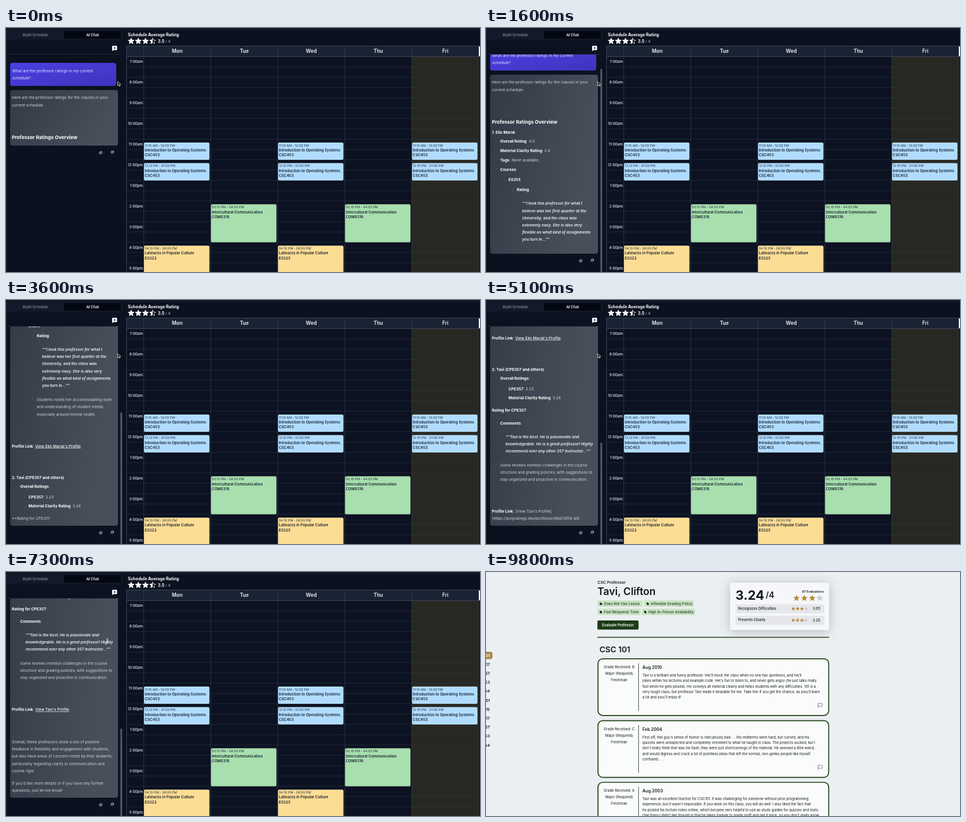
These frames come from a looping animation (800 px wide and 413 px high, 9900 ms). An HTML page:

```html
<!DOCTYPE html>
<html lang="en">
<head>
<meta charset="utf-8">
<title>Schedule chat</title>
<style>
html, body { margin: 0; width: 100%; height: 100%; overflow: hidden; background: #0c1120; }
svg { display: block; width: 800px; height: 413px; font-family: Inter, "Liberation Sans", sans-serif; }
text { white-space: pre; }
.m { font-weight: 500; }
.s { font-weight: 600; }
.b { font-weight: 700; }
.q { font-weight: 600; font-style: italic; }
.mid { text-anchor: middle; }
.end { text-anchor: end; }
#rating { filter: drop-shadow(0 2px 9px rgba(40, 50, 60, .28)); }
</style>
</head>
<body>
<svg viewBox="0 0 800 413">
  <defs>
    <linearGradient id="bubble" x2="1" y2="1"><stop stop-color="#4a40e2"/><stop offset="1" stop-color="#3e34be"/></linearGradient>
    <linearGradient id="card" x2="1" y2=".35"><stop stop-color="#323a46"/><stop offset="1" stop-color="#484f5a"/></linearGradient>
    <clipPath id="view"><rect y="45" width="203" height="368"/></clipPath>
  </defs>
  <g id="planner"></g>
  <rect id="blank" width="800" height="413" fill="#2d2d2d"/>
  <g id="profile"></g>
  <g id="cursor">
    <path id="arrow" d="M0 0V7.2L1.7 5.7L2.9 8.3L4.1 7.7L2.9 5.2H5.2Z" fill="#111" stroke="#fff" stroke-width=".7"/>
    <path id="beam" d="M-2 0Q0 0 0 1V6Q0 7 -2 7M2 0Q0 0 0 1M0 6Q0 7 2 7M-1 3.5H1" fill="none" stroke="#fff" stroke-width=".8"/>
  </g>
</svg>
<script>
const LOOP = 9900, STEP = 100;
const el = id => document.getElementById(id);

// Drawing helpers; text is placed by its vertical centre.
const text = (x, cy, size, str, fill, cls = '') =>
  `<text x="${x}" y="${cy + size * .36}" font-size="${size}" fill="${fill}" class="${cls}">${str}</text>`;
const rect = (x, y, w, h, fill, r = 0, more = '') =>
  `<rect x="${x}" y="${y}" width="${w}" height="${h}" rx="${r}" fill="${fill}" ${more}/>`;
const path = (d, stroke, width = .8, fill = 'none') =>
  `<path d="${d}" fill="${fill}" stroke="${stroke}" stroke-width="${width}" stroke-linejoin="round"/>`;
const star = (cx, cy, r, fill, part = 1, stroke = 'none') => {
  const edge = cx - r + 2 * r * part;
  const pts = Array.from({ length: 10 }, (_, i) => {
    const a = i * Math.PI / 5 - Math.PI / 2, d = i % 2 ? r * .46 : r;
    return [Math.min(edge, cx + d * Math.cos(a)).toFixed(2), (cy + d * Math.sin(a)).toFixed(2)];
  });
  return `<polygon points="${pts.join(' ')}" fill="${fill}" stroke="${stroke}" stroke-width=".7" stroke-linejoin="round"/>`;
};
const lerpTable = (table, t) => {
  let i = 1;
  while (i < table.length - 1 && table[i][0] < t) i++;
  const a = table[i - 1], b = table[i];
  const k = Math.max(0, Math.min(1, (t - a[0]) / (b[0] - a[0])));
  return a.slice(1).map((v, j) => v + (b[j + 1] - v) * k);
};

// ---- Planner: tabs and calendar ----
const COL = 113.1, HOUR = 34.9, LEFT = 232.5, TOP = 48.5;

function event(day, from, to, title, code, time, fill) {
  const x = LEFT + day * COL + .5, y = TOP + (from - 7) * HOUR;
  return rect(x, y, 110.2, (to - from) * HOUR, fill, 2, 'stroke="#fff" stroke-opacity=".35" stroke-width=".6"') +
    text(x + 1.2, y + 4.7, 5.4, time, '#263040') +
    text(x + 1.2, y + 12.7, 6.25, title, '#1a2230', 's') +
    text(x + 1.2, y + 21.3, 6.25, code, '#1a2230', 's');
}

function calendar() {
  let s = rect(203, 30, 597, 383, '#0c1221') + rect(204, 30.5, 594, 18, '#1a2333') +
    rect(LEFT + 4 * COL, TOP, COL, 365, '#282823');
  for (let i = 1; i < 21; i++) s += path(`M204 ${TOP + i * HOUR / 2}H798`, '#2b3446', .6);
  for (let i = 0; i < 6; i++) s += path(`M${LEFT + i * COL} 30.5V413`, '#3a4354', .7);
  s += path('M203.5 413V30.5H798M204 48.5H798', '#465062', .8) + rect(798, 31, 2, 17, '#f4f5f7');
  ['Mon', 'Tue', 'Wed', 'Thu', 'Fri'].forEach((d, i) =>
    s += text(LEFT + (i + .5) * COL, 38.5, 8.4, d, '#f3f4f6', 's mid'));
  for (let h = 7; h < 18; h++)
    s += text(231, 57 + (h - 7) * 34.95, 6.2, `${(h - 1) % 12 + 1}:00${h < 12 ? 'am' : 'pm'}`, '#e8eaee', 'm end');
  const os = 'Introduction to Operating Systems';
  for (const d of [0, 2, 4]) {
    s += event(d, 11 + 1 / 6, 12, os, 'CSC453', '11:10 AM - 12:00 PM', '#b0dcff');
    s += event(d, 12 + 1 / 6, 13, os, 'CSC453', '12:10 PM - 01:00 PM', '#b0dcff');
  }
  for (const d of [1, 3])
    s += event(d, 14 + 1 / 6, 16, 'Intercultural Communication', 'COMS316', '02:10 PM - 04:00 PM', '#a7e0ae');
  for (const d of [0, 2])
    s += event(d, 16 + 1 / 6, 18, 'Latina/os in Popular Culture', 'ES323', '04:10 PM - 06:00 PM', '#fddd94');
  return s;
}

function planner() {
  let s = rect(0, 0, 800, 413, '#0c1120') + path('M0 2.5H800M.5 2V413', '#283042', .7) +
    rect(1, 4, 195, 15, '#131a2a', 2) + rect(98, 5, 96, 13, '#030711', 2) +
    text(49.7, 11.5, 6, 'Build Schedule', '#8a93a3', 'm mid') +
    text(146.2, 11.5, 6.1, 'AI Chat', '#fff', 's mid') +
    path('M1 20.5H196', '#1c2434', .6) + path('M1 44.5H196', '#2a3243', .7) +
    path('M179.5 30.5H187V37H181.5L179.5 38.6Z', '#fff', .8, '#fff') +
    path('M183.3 32.2V35.6M181.6 33.9H185', '#0c1120', .9) +
    '<g clip-path="url(#view)"><g id="chat"></g></g><g id="bar"></g>' +
    text(205.8, 11.5, 7.05, 'Schedule Average Rating', '#fff', 'b');
  for (let i = 0; i < 3; i++) s += star(211.2 + i * 12.1, 22.3, 5.5, '#fff', 1, '#fff');
  s += star(247.5, 22.3, 5.5, 'none', 1, '#fff') + star(247.5, 22.3, 5.5, '#fff', .5) +
    text(256.3, 22.5, 7, '3.5', '#fff', 'b') + text(269, 22.5, 6.6, '/ 4', '#b4bac4');
  return s + calendar();
}

// ---- Chat: rows are [centre y, x, text, kind, space below]; *..* is bold ----
const SITE = 'https://polyratings.dev/professor/';
const link = (label, id) => ({ label, url: SITE + id });
const ROWS = [
  [118, 10, 'Here are the professor ratings for the classes in your'],
  [130.3, 10, 'current schedule:'],
  [185, 10, 'Professor Ratings Overview', 'h', 14],
  [203, 10, '*1. Elin Marsk*'],
  [217.7, 24, '*Overall Rating*: 4.0', 'li'],
  [233.6, 24, '*Material Clarity Rating*: 2.0', 'li'],
  [249.3, 24, '*Tags*: None available.', 'li'],
  [265.2, 24, '*Courses*:', 'li'],
  [282.6, 38, '*ES255*', 'li'],
  [299.7, 52, '*Rating*:', 'li'],
  [323, 61, '““I took this professor for what I', 'q', 24],
  [335.2, 61, 'believe was her first quarter at the', 'q', 24],
  [347.4, 61, 'University, and the class was', 'q', 24],
  [359.6, 61, 'extremely easy. She is also very', 'q', 24],
  [371.8, 61, 'flexible on what kind of assignments', 'q', 24],
  [384, 61, 'you turn in...””', 'q', 24],
  [408, 52, 'Students noted her accommodating style', 'li'],
  [420.3, 52, 'and understanding of student needs,'],
  [432.5, 52, 'especially around mental health.'],
  [486.5, 10, '*Profile Link*: ', link("View Elin Marsk's Profile", '5d0c27fa-3be1-4c8e-a7f2-90d41b6e8c35')],
  [540.2, 10, '*2. Tavi (CPE357 and others)*'],
  [555, 24, '*Overall Ratings*:', 'li'],
  [572.6, 38, '*CPE357*: 3.23', 'li'],
  [588.3, 38, '*Material Clarity Rating*: 3.24', 'li'],
  [609.3, 10, '*Rating for CPE357*:'],
  [630.5, 24, '*Comments*:', 'li'],
  [653.4, 33, '““Tavi is the best. He is passionate and', 'q', 24],
  [665.6, 33, 'knowledgeable. He is a great professor! Highly', 'q', 24],
  [677.9, 33, 'recommend over any other 357 instructor...””', 'q', 24],
  [701.4, 24, 'Some reviews mention challenges in the course', 'li'],
  [713.6, 24, 'structure and grading policies, with suggestions to'],
  [725.8, 24, 'stay organized and proactive in communication.'],
  [780, 10, '*Profile Link*: ', link("View Tavi's Profile", '8bb1391d-a16e-4d27-b1c9-3f7a60e25d18')],
  [834.5, 10, 'Overall, these professors show a mix of positive'],
  [846.8, 10, 'feedback in flexibility and engagement with students,'],
  [859, 10, 'but also have areas of concern noted by their students,'],
  [871.3, 10, 'particularly regarding clarity in communication and'],
  [883.5, 10, 'course rigor.'],
  [904.6, 10, "If you'd like more details or if you have any further"],
  [917, 10, 'questions, just let me know!']
].map(([y, x, str, kind, pad = 12]) => {
  const full = kind?.url ? `${str}[${kind.label}](${kind.url})` : str;
  return { y, x, str, kind, pad, full };
});
let total = 0;
for (const r of ROWS) { r.at = total; total += r.full.length; }

const upTo = s => {
  const r = ROWS.find(row => row.full.includes(s));
  return r.at + r.full.indexOf(s) + s.length;
};
const TYPED = [
  [0, upTo('Ratings Overview')], [1600, upTo('you turn in...””')],
  [3600, upTo('*Rating for CPE357')], [5100, upTo('8bb1391d-a16')], [6700, total]
];

// An unfinished bold run still shows its asterisks.
const rich = s => s.split('*').map((p, i, all) =>
  i % 2 === 0 ? p : i < all.length - 1 ? `<tspan class="b" fill="#fff">${p}</tspan>` : '**' + p).join('');

const SIZE = 6.53, LINE = 12.2, BODY = '#d0d4da';

function drawRow(r, n) {
  let out = '', last = r.y;
  const line = (y, str) => out += text(r.x, y, SIZE, str, BODY);
  if (r.kind === 'h') out = text(r.x, r.y, 8.15, r.full.slice(0, n), '#fff', 'b');
  else if (r.kind === 'q') out = text(r.x, r.y, SIZE, r.full.slice(0, n), '#f3f4f6', 'q');
  else if (r.kind?.url) {
    if (n >= r.full.length)
      line(r.y, rich(r.str) + `<tspan class="m" fill="#fff" text-decoration="underline">${r.kind.label}</tspan>`);
    else {
      const split = r.full.indexOf('](') + 1, cut = r.full.slice(0, n);
      line(r.y, rich(cut.slice(0, split)));
      (cut.slice(split).match(/.{1,47}/g) || []).forEach(p => line(last += LINE, p));
    }
  } else {
    line(r.y, rich(r.full.slice(0, n)));
    if (r.kind === 'li') out += `<circle cx="${r.x - 7}" cy="${r.y}" r=".9" fill="#515a67"/>`;
  }
  return [out, last + r.pad];
}

const thumb = (x, y, flip) =>
  `<g transform="translate(${x} ${y}) scale(${flip})">` +
  path('M-2.2 -.3H-1.1V2.3H-2.2ZM-1.1 -.3L.2 -2.4Q1 -2.2 .7 -.6H2.3L1.8 2.3H-1.1', '#e8eaee', .7) + '</g>';

function drawChat(t) {
  const typed = Math.round(lerpTable(TYPED, t)[0]);
  let body = '', bottom = 0;
  for (const r of ROWS) {
    const n = typed - r.at;
    if (n <= 0) break;
    const [s, b] = drawRow(r, n);
    body += s;
    bottom = b;
  }
  const scroll = Math.max(0, bottom - 382);
  el('chat').setAttribute('transform', `translate(0 ${-scroll})`);
  el('chat').innerHTML = rect(7, 59, 179, 39, 'url(#bubble)', 4) +
    text(10.5, 72.3, SIZE, 'What are the professor ratings in my current', '#e6e9ff') +
    text(10.5, 84.8, SIZE, 'schedule?', '#e6e9ff') +
    rect(7, 105, 182, bottom - 105, 'url(#card)', 4) + body +
    thumb(160, bottom + 11.5, 1) + thumb(179.5, bottom + 11.5, -1);
  const len = 368 * 368 / (368 + scroll);
  el('bar').innerHTML = scroll ? rect(192.8, 413 - len, 3.4, len, '#4a5260', 1.5) : '';
}

// ---- Professor page ----
const GREEN = '#21451b', INK = '#15181c', GOLD = '#b98a34', PALE = '#c9ced6';

const tag = (x, y, w, label) => rect(x, y, w, 11, '#c9e6c5', 2) +
  path(`M${x + 4} ${y + 4}h2l2.2 2.2l-2 2l-2.2 -2.2Z`, INK, .4, INK) +
  text(x + 11, y + 5.6, 6.1, label, '#2a3a2a', 'm');

function review(y, grade, date, lines) {
  let s = rect(189, y + .8, 389.4, 96, '#fafcfb', 8, `stroke="${GREEN}" stroke-width="1.7"`);
  ['Grade Received: ' + grade, 'Major (Required)', 'Freshman'].forEach((l, i) =>
    s += text(224.7, y + 15 + i * 11, 5.95, l, INK, 'mid'));
  s += path(`M257.5 ${y + 8.5}v80.5`, '#3a3f45', .9) + text(264, y + 15.5, 7.2, date, INK, 's');
  lines.forEach((l, i) => s += text(264, y + 28.8 + i * 9.35, 5.9, l, INK));
  return s + path(`M560.5 ${y + 84}v-7.5q2 -.9 3.6 0t3.6 0v4.8q-2 .9 -3.6 0t-3.6 0`, '#4c5a68', .7);
}

function score(y, label, value, part) {
  let s = rect(421, y, 150, 15.5, '#e5e7ea', 2) + text(425.5, y + 7.3, 5.9, label, INK, 'm') +
    text(564, y + 7.5, 6, value, INK, 'm end');
  for (let i = 0; i < 4; i++) s += star(518.6 + i * 7.3, y + 7.7, 3.5, i < 3 ? GOLD : PALE);
  return s + star(540.5, y + 7.7, 3.5, GOLD, part);
}

function profile() {
  let s = rect(0, 0, 800, 413, '#eceff2') + '<g id="page">' +
    text(188.3, 17.6, 6.7, 'CSC Professor', INK, 's') +
    text(188, 33.2, 17.2, 'Tavi, Clifton', INK, 's') +
    tag(188, 48, 77, 'Does Not Use Lessia') + tag(267, 48, 84, 'Inflexible Grading Policy') +
    tag(188, 62, 73, 'Fast Response Time') + tag(263, 62, 90, 'High In-Person Availability') +
    rect(188, 82, 69.5, 15.5, '#1d3b16', 2) + text(222.8, 89.8, 5.9, 'Evaluate Professor', '#fff', 's mid') +
    path('M188 110.5H579', GREEN, 1.5) +
    `<g id="rating">${rect(412, 18, 167, 80, '#f5f7f9', 3)}</g>` +
    text(421, 38.7, 21.7, '3.24', INK, 'b') + text(472, 39, 14, '/4', INK, 's') +
    text(570, 33.6, 5.2, '87 Evaluations', INK, 's end');
  for (let i = 0; i < 4; i++) s += star(524 + i * 13.3, 44.3, 5.8, i < 3 ? GOLD : PALE);
  s += star(563.9, 44.3, 5.8, GOLD, .24) +
    score(54.5, 'Recognizes Difficulties', '3.05', .05) + score(74, 'Presents Clearly', '3.25', .25) +
    text(191.5, 130.8, 13.4, 'CSC 101', INK, 's') + rect(-8, 135, 19, 12.5, '#ac8a4e', 4);
  ['01', '17', '57', '53', '64', '01', '15', '17', '57', '53', '64'].forEach((n, i) =>
    s += text(6.6, 141.2 + i * 15.2, 6.5, n, i ? INK : '#fff', 's end'));
  s += review(146, 'B', 'Aug 2010', [
    String.raw`Tavi is a brilliant and funny professor. He\'ll mock the class when no one has questions, and he\'ll make`,
    String.raw`jokes within his lectures and example code. He\'s fun to listen to, and never gets angry (he just talks really`,
    'fast when he gets pissed). He conveys all material clearly and helps students with any difficulties. 101 is a',
    String.raw`very tough class, but professor Tavi made it bearable for me. Take him if you get the chance, as you\'ll learn`,
    String.raw`a lot and you\'ll enjoy it!`
  ].map((l, i) => i ? l : l.replace(/ make$/, '')));
  s += review(250.8, 'C', 'Feb 2004', [
    "First off, this guy's sense of humor is ridiculously bad. ... His midterms were hard, but curved, and his",
    'quizzes were unexpected and completely irrevelent to what he taught in class. The projects sucked, but I',
    "don't really think that was his fault, they were just shortcomings of the material. He seemed a little weird,",
    'and would digress and crack a lot of pointless jokes that left the normal, non-geeky people like myself',
    'confused.... .'
  ]);
  s += review(355.2, 'A', 'Aug 2003', [
    'Tavi was an excellent teacher for CSC101. It was challenging for someone without prior programming',
    "experience, but it wasn't impossible. If you work on this class, you will do well. I also liked the fact that",
    'he posted his lecture notes online, which became very helpful to use as study guides for quizzes and tests.',
    "One thing I didn't like though is that he takes forever to grade stuff and get it back, so you don't really know"
  ]);
  return s + '</g>';
}

// ---- Timeline ----
const BLANK_AT = 8100, PROFILE_AT = 9300;
const POINTER = [[0, 188.5, 90.5], [7000, 188.5, 90.5], [7300, 171, 113], [8000, 84, 230], [8100, 84, 230], [8600, 97, 36], [9300, 97, 36]];
const PAGE_SHIFT = [[9500, 18], [9600, 10], [9700, 4], [9800, 0]];

el('planner').innerHTML = planner();
el('profile').innerHTML = profile();
const show = (id, on) => el(id).setAttribute('visibility', on ? 'visible' : 'hidden');

function render(t) {
  show('planner', t < BLANK_AT);
  show('blank', t >= BLANK_AT && t < PROFILE_AT);
  show('profile', t >= PROFILE_AT);
  show('cursor', t < PROFILE_AT);
  if (t < BLANK_AT) drawChat(t);
  const [x, y] = lerpTable(POINTER, t);
  const beam = t >= 7200 && t < 7900;
  el('cursor').setAttribute('transform', `translate(${x} ${y})`);
  el('beam').style.display = beam ? '' : 'none';
  el('arrow').style.display = beam ? 'none' : '';
  el('page').setAttribute('transform', `translate(0 ${lerpTable(PAGE_SHIFT, t)[0]})`);
}

const start = performance.now();
let shown = -1;
function tick() {
  const t = Math.floor((performance.now() - start) % LOOP / STEP) * STEP;
  if (t !== shown) render(shown = t);
  requestAnimationFrame(tick);
}
tick();
</script>
</body>
</html>
```
